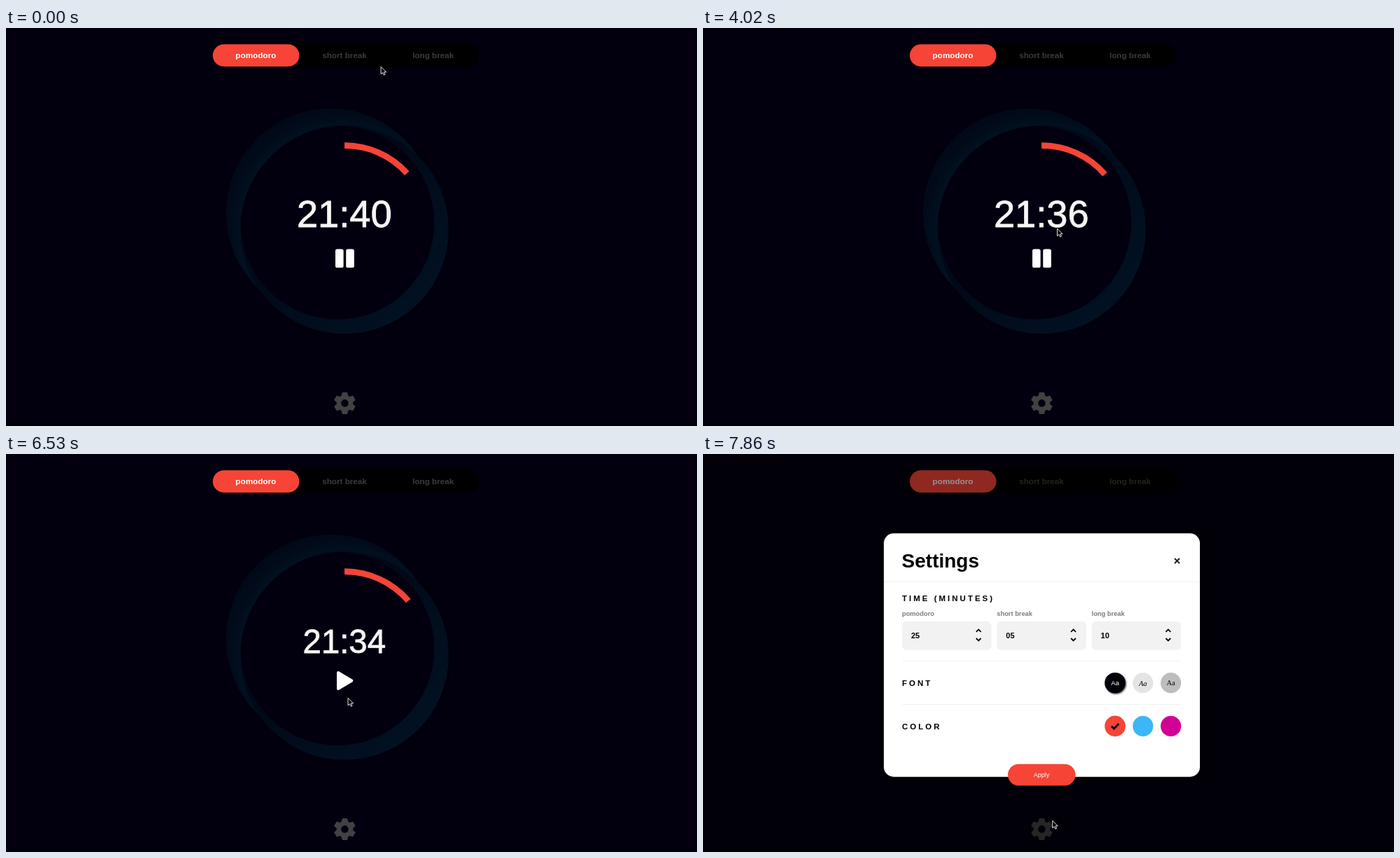
Recreate the animation shown at these times as an HTML page. Size 986x568 px, loop 8000 ms.

```html
<!DOCTYPE html>
<html lang="en">
<head>
<meta charset="utf-8">
<title>Pomodoro timer</title>
<style>
  html, body { margin: 0; width: 100%; height: 100%; overflow: hidden; background: #02000f; }
  svg { display: block; width: 100%; height: 100%; font-family: "Liberation Sans", Arial, sans-serif; }
  .mid { text-anchor: middle; }
  .tabs { font-size: 11.7px; font-weight: bold; fill: #3b3b3b; }
  .heading { font-size: 11.5px; font-weight: bold; letter-spacing: 3px; }
  .label { font-size: 9.3px; font-weight: bold; fill: #7b7b7b; }
  .value { font-size: 11px; font-weight: bold; }
  .sample { font-size: 9.5px; }
  .serif { font-family: "Liberation Serif", "Noto Serif", serif; font-size: 10.5px; }
  .chevron { fill: none; stroke: #000; stroke-width: 1.8; }
</style>
</head>
<body>
<svg viewBox="0 0 986 568">
  <defs>
    <radialGradient id="glow" gradientUnits="userSpaceOnUse" cx="483" cy="288" r="178">
      <stop offset=".83" stop-color="#011120"/>
      <stop offset=".92" stop-color="#010b1a"/>
      <stop offset="1" stop-color="#010917"/>
    </radialGradient>
    <linearGradient id="rim" gradientUnits="userSpaceOnUse" x1="465" y1="270" x2="580" y2="385">
      <stop offset="0" stop-color="#010918"/>
      <stop offset=".4" stop-color="#010d1d"/>
      <stop offset="1" stop-color="#011121"/>
    </linearGradient>
    <clipPath id="dial"><circle cx="483" cy="287.8" r="148.7"/></clipPath>
    <filter id="soft"><feGaussianBlur stdDeviation="4"/></filter>
    <filter id="tight" x="-30%" y="-30%" width="160%" height="160%"><feGaussianBlur stdDeviation="1"/></filter>
    <g id="arrow"><path d="M0 .3V10.8L2.5 8.6 4.2 12.2 5.9 11.4 4.3 7.9H7.6Z" fill="#000" stroke="#fff" stroke-width=".9" stroke-linejoin="round"/></g>
    <g id="hand"><path d="M-2.4-5Q-1.2-6-.4-4.6L.5-2 3.4-1.6Q5-1.2 4.8.6L4.2 3.4 3.2 5H-.8L-2.4 2.8-4.4.8Q-4.4-.7-2.8-.2L-1.5.6Z" fill="#fff" stroke="#111" stroke-width=".7"/></g>
  </defs>

  <rect width="986" height="568" fill="#02000f"/>
  <rect y="566" width="986" height="2" fill="#000"/>

  <rect x="293" y="21" width="382" height="36" rx="18" fill="#000"/>
  <rect x="295" y="23.3" width="123.5" height="31.7" rx="15.8" fill="#f64437"/>
  <g class="tabs mid">
    <text x="356.5" y="43" fill="#fff">pomodoro</text>
    <text x="483" y="43">short break</text>
    <text x="609.5" y="43">long break</text>
  </g>

  <circle cx="492" cy="296" r="149" fill="#010007" filter="url(#soft)"/>
  <circle cx="463" cy="264" r="149" fill="url(#glow)"/>
  <g clip-path="url(#dial)">
    <circle cx="483" cy="287.8" r="149" fill="url(#rim)"/>
    <circle cx="473" cy="277.8" r="138.2" fill="#02000f"/>
  </g>
  <path id="progress" fill="none" stroke="#f64437" stroke-width="8.6"/>
  <text id="clock" class="mid" x="482.8" y="284" fill="#f6f6f6" stroke="#f6f6f6" stroke-width=".8"></text>
  <g id="pause" fill="#fff">
    <rect x="470" y="315.5" width="11.6" height="26.6" rx="2.6"/>
    <rect x="485.2" y="315.5" width="11.6" height="26.6" rx="2.6"/>
  </g>
  <path id="play" d="M474 312V335L493.3 323.5Z" fill="#fff" stroke="#fff" stroke-width="4" stroke-linejoin="round"/>
  <g id="gear" transform="translate(483.4 535.4)">
    <circle r="8.5" fill="none" stroke="currentColor" stroke-width="6.4"/>
  </g>

  <g id="modal">
    <rect width="986" height="568" opacity=".42"/>
    <rect x="258" y="113.3" width="451" height="347.4" rx="14" fill="#fff"/>
    <text x="283.6" y="162" font-size="28" font-weight="bold">Settings</text>
    <path d="M673 149l7 7m0-7l-7 7" stroke="#222" stroke-width="2"/>
    <path d="M258 182.5H709M284 295.5H682M284 357.5H682" stroke="#f1f1f1"/>
    <g class="heading">
      <text x="284" y="209.6">TIME (MINUTES)</text>
      <text x="284" y="331">FONT</text>
      <text x="284" y="392.5">COLOR</text>
    </g>
    <g id="fields"></g>
    <circle cx="589.3" cy="328" r="14.8" fill="#555" filter="url(#tight)"/>
    <circle cx="588" cy="326.7" r="14.8" fill="#020008"/>
    <circle cx="627.8" cy="326.7" r="14.6" fill="#e4e4e4"/>
    <circle cx="667.6" cy="326.7" r="14.6" fill="#bdbdbd"/>
    <g class="mid">
      <text class="sample" x="588" y="330" fill="#fff">Aa</text>
      <text class="serif" x="627.8" y="330.5" font-style="italic">Aa</text>
      <text class="serif" x="667.6" y="330">Aa</text>
    </g>
    <circle cx="588" cy="388.4" r="14.8" fill="#f64437"/>
    <circle cx="627.8" cy="388.4" r="14.6" fill="#3cb6f6"/>
    <circle cx="667.6" cy="388.4" r="14.6" fill="#d30096"/>
    <path d="M583 388.5l3.4 3.4 6.8-7" fill="none" stroke="#000" stroke-width="2.8"/>
    <rect x="435" y="442.4" width="96.5" height="30.8" rx="15.4" fill="#f64437"/>
    <text class="mid" x="483" y="460.7" font-size="9" fill="#fff">Apply</text>
  </g>
  <use id="cursor"/>
</svg>
<script>
  const $ = id => document.getElementById(id);
  const LOOP = 8000, SESSION = 1500, START = 1300;
  const TICKS = [750, 1790, 2690, 3730, 4750, 5650];

  // [time, value], held until the next entry
  const CLOCK_SIZE = [[0, 54.2], [5950, 49], [6090, 47.8], [6240, 47.3]];
  // [time, shape, x, y]
  const CURSOR = [
    [0, 'arrow', 535, 55], [3430, 'arrow', 534, 63], [3580, 'arrow', 532, 100],
    [3730, 'arrow', 524, 165], [3870, 'arrow', 514, 235], [4020, 'arrow', 505.5, 286],
    [4160, 'arrow', 497, 314], [4310, 'hand', 487, 337], [4460, 'hand', 483, 347],
    [4900, 'hand', 485, 338], [5650, 'hand', 488.5, 338.5],
    [6530, 'arrow', 488, 348], [6680, 'arrow', 489, 405], [6820, 'arrow', 490, 475],
    [6970, 'hand', 493, 536], [7120, 'hand', 494.5, 546],
    [7270, 'arrow', 492, 539.5], [7860, 'arrow', 498.7, 523]
  ];
  const at = (track, t) => track.findLast(step => step[0] <= t);
  const show = (id, on) => $(id).style.display = on ? '' : 'none';

  for (let i = 0; i < 6; i++) {
    $('gear').innerHTML += `<path transform="rotate(${i * 60})" fill="currentColor" stroke="currentColor"
      stroke-width="1.4" stroke-linejoin="round" d="M-4.3-9L-3.1-14.8H3.1L4.3-9Z"/>`;
  }

  [['pomodoro', '25'], ['short break', '05'], ['long break', '10']].forEach(([label, value], i) => {
    $('fields').innerHTML += `<g transform="translate(${284 + i * 135.3} 0)">
      <text class="label" y="231.3">${label}</text>
      <rect y="238.7" width="127.5" height="41" rx="6" fill="#f2f2f2"/>
      <text class="value" x="13" y="262.8">${value}</text>
      <path class="chevron" d="M105.8 253.8l3.4-3.4 3.4 3.4M105.8 263l3.4 3.4 3.4-3.4"/></g>`;
  });

  function draw(t) {
    const left = START - TICKS.filter(tick => tick <= t).length;
    const angle = (1 - left / SESSION) * 2 * Math.PI;
    const radius = 120, cx = 483, cy = 287.6;
    $('progress').setAttribute('d', `M${cx} ${cy - radius}A${radius} ${radius} 0 0 1 ` +
      `${cx + radius * Math.sin(angle)} ${cy - radius * Math.cos(angle)}`);

    $('clock').textContent = `${Math.floor(left / 60)}:${String(left % 60).padStart(2, '0')}`;
    $('clock').setAttribute('font-size', at(CLOCK_SIZE, t)[1]);

    show('pause', t < 5950);
    show('play', t >= 6090);
    show('modal', t >= 7270);
    $('gear').style.color = t >= 6970 && t < 7270 ? '#fafafa' : '#424242';

    const [, shape, x, y] = at(CURSOR, t);
    $('cursor').setAttribute('href', '#' + shape);
    $('cursor').setAttribute('transform', `translate(${x} ${y})`);
  }

  const origin = performance.now();
  function frame() {
    draw((performance.now() - origin) % LOOP);
    requestAnimationFrame(frame);
  }
  frame();
</script>
</body>
</html>
```
